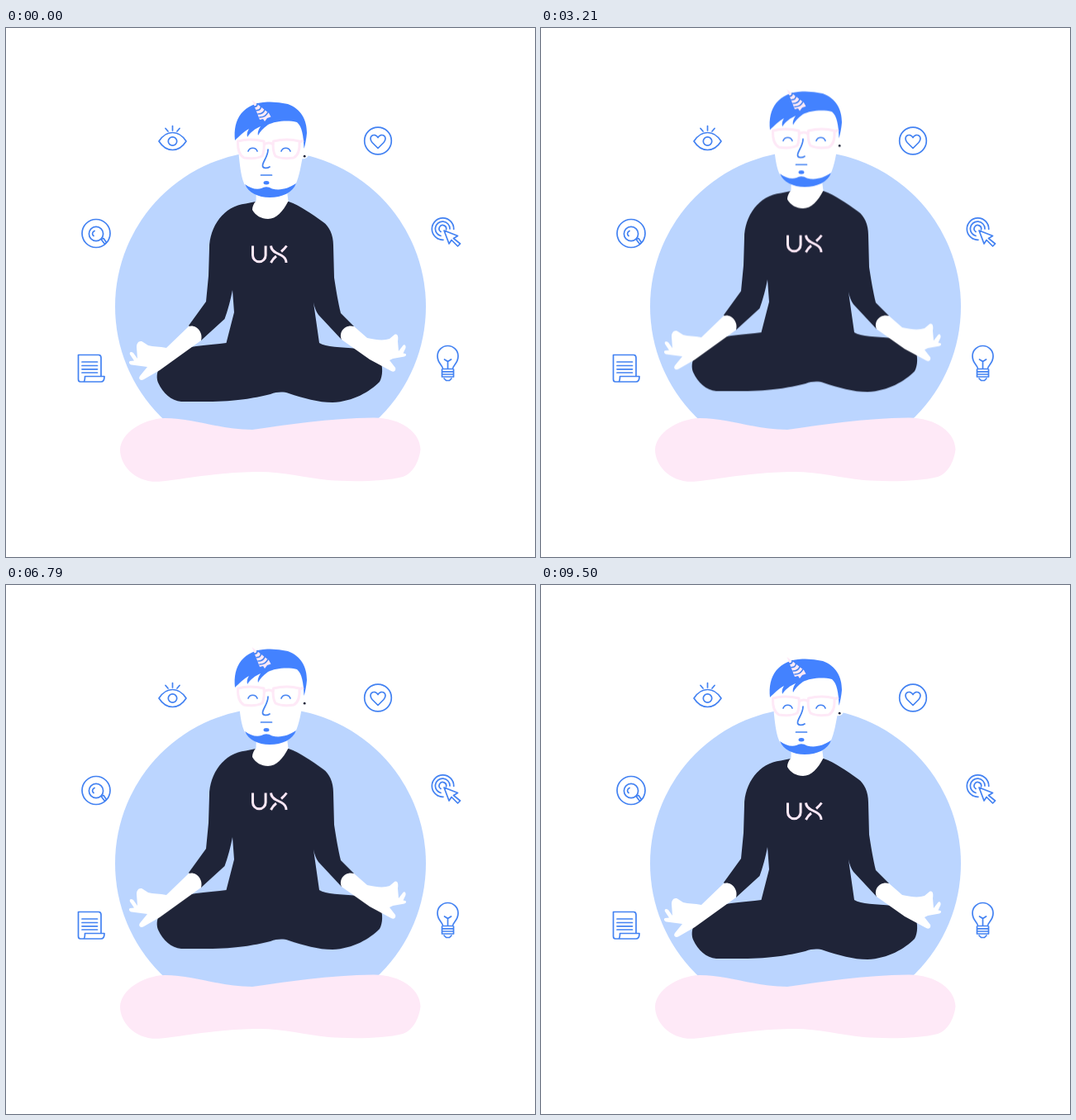
These frames come from a looping animation (640 by 640 pixels, 9570 ms). An HTML page:

```html
<!DOCTYPE html>
<html lang="en">
<head>
<meta charset="utf-8">
<title>Meditation</title>
<style>
  html, body { margin: 0; width: 100%; height: 100%; overflow: hidden; background: #fff; }
  svg { display: block; width: 100%; height: 100%; }
  .blue { fill: #4382ff; }
  .navy { fill: #1f2438; }
  .pink { fill: #fee9f7; }
  .white { fill: #fff; }
  .line { fill: none; stroke: #4382f2; stroke-width: 1.7; stroke-linecap: round; stroke-linejoin: round; }
  .rose { fill: none; stroke: #fee9f7; stroke-width: 3; stroke-linejoin: round; }
  .float { animation: float 9570ms linear infinite; }
  @keyframes float {
    0% { transform: translateY(0); animation-timing-function: cubic-bezier(.333, 0, .667, 1); }
    52.25% { transform: translateY(-18px); }
    52.98% { transform: translateY(-18px); animation-timing-function: cubic-bezier(.333, 0, .667, 1); }
    99.27%, 100% { transform: translateY(0); }
  }
</style>
</head>
<body>
<svg viewBox="0 0 640 640">
  <circle cx="320" cy="337" r="188" fill="#bbd5ff"/>
  <path class="pink" d="M138 510C139 490 165 473 192 472C228 472 258 486 298 486C340 480 390 472 445 471.500C480 472 501 490 501.500 510C500 522 494 538 480 543C458 549 415 549 390 547C360 544 335 536 300 537C250 538 215 546 188 548.500C158 552 138 530 138 510Z"/>

  <g class="line">
    <g id="eye">
      <path d="M185 137C194 123 209 123 218 137C209 151 194 151 185 137ZM201.500 118.500V124M193 121.500L196 125M210 121.500L207 125"/>
      <circle cx="201.500" cy="137" r="5.200"/>
    </g>
    <g id="heart">
      <circle cx="450" cy="136.500" r="16.300"/>
      <path d="M450 145.500L443 138.500C437 131 446 126 450 132.500C454 126 463 131 457 138.500Z"/>
    </g>
    <g id="search">
      <circle cx="109" cy="248.500" r="17"/>
      <circle cx="109" cy="249" r="8.600"/>
      <path d="M107 245.500C104 247 104 250 106 251.500M115 255.500L118 254.500L121.500 259.500L119.500 261.500Z"/>
    </g>
    <g id="target">
      <path d="M529 256.300A13.200 13.200 0 1 1 541.700 243.500M526 251.500A8.800 8.800 0 1 1 537 243M526 246.500A4.300 4.300 0 1 1 532.500 244"/>
      <path d="M530 245L546.500 251.500L541.500 254.500L549.500 261L546.500 264L539 256.500L536 261Z"/>
    </g>
    <g id="scroll">
      <path d="M94 428H90Q87.500 428 87.500 425V395.500H112Q115 395.500 115 399V421.500M94 428Q95.500 427 95.500 421.500H119Q119 428 115 428ZM92 404H110.500M92 408.500H110.500M92 412.800H110.500M92 417H110.500"/>
    </g>
    <g id="bulb">
      <path d="M528.500 412.500C528.500 408 522 406 522 397A12.500 12.500 0 0 1 547 397C547 406 540.500 408 540.500 412.500ZM534.500 412V403.500L530.500 401M534.500 403.500L538.500 401"/>
      <path d="M528 415.800H541M528 419H541M528 422H541M530 424L532.500 426.500H536.500L539 424M527.500 413V422M541.500 413V422"/>
    </g>
  </g>

  <g class="float">
    <path class="navy" d="M302 210L290 212.500C264 215 246 240 246 267L245 300L242 331L221 360L236 378L264.500 352C268 343 272 328 274 317L276 344L266.500 381C245 384 225 384 215 389L186 411C182 416 182 424 184 429C190 442 200 451 212 452L250 452C285 451 303 447 320 443C328 440 336 440 342 442C360 448 378 453 395 453C420 452 440 440 452 428C456 421 456 410 453 402C445 393 435 388 425 388C405 386 387 386 379 381L372 332C373 337 375 343 378 347L406 377L421 361L405 345C402 333 399 315 397 302L396 263C396 250 391 240 384 235C370 225 356 215 342 210Z"/>
    <path class="white" d="M303 190L302.500 209C299 213 298 217 298 220C302 227 309 231 317 231C327 231 335 222 341.500 209.500L339 190Z"/>
    <path class="white" d="M221 361L194 387C186 385 178 386 172 384L165 379.500C161 378 158 381 158 386L159 400L154 393C151 391 149 392 150 395L155 402.500L150 403C148 404 149 407 152 407.500L171 410L162 421C160 424 162 427 166 425.500L186 414L236 378C239 368 230 358 221 361Z"/>
    <path class="white" d="M421 361L437 375C450 378 458 378 464 376L470 371C474 369 475 374 474 379L475 391L480 384.500C482 382 484 384 483.500 387L480.500 393.500C485 393.500 485 396.500 482 397.500L468 400L464 402L471 411C472 414 470 417 466 415L440 401L406 377C402 368 410 358 421 361Z"/>

    <g id="head">
      <path class="white" d="M280 125L281 146C283 170 285 182 289 190C298 204 341 204 350 190C355 180 357 165 358.500 158C368 160 369 145 361 143L357 110H290Z"/>
      <path class="blue" d="M277 136C274 110 287 91 316 89.500Q329 89 341 92C357 98 364 111 364 127Q363 138 360.500 146C360 130 358 119 352 114C340 111 325 113 317 117C311 121 307 126 305 130C304 126 306 122 308 119C301 122 296 126 292 132C291 128 292 125 294 122C288 125 282 131 277 136Z"/>
      <path class="pink" d="M297.500 87L307 111L311 110L313 113L316 109L320.500 107.500L318 103Z"/>
      <path class="line" stroke-width="1.400" d="M300.500 95Q304 95.500 304 91.500M303 99.500Q308 100 308.500 95M305 104Q311 104 313 99M307 108Q314 108 316.500 102.500"/>
      <g class="rose">
        <path d="M280.500 137Q295 133 312 137Q313 148 310 155Q302 159 288 157Q280 153 280.500 137Z"/>
        <path d="M323.500 137Q340 133 355 137Q356 153 348 157Q334 159 326 155Q322 148 323.500 137Z"/>
        <path d="M312 141Q318 137 323.500 141M355 138L360 136"/>
      </g>
      <path class="line" d="M293 149C295 144 302 144 304 149M333 149C335 144 342 144 344 149M317 147C317 156 310 162 310.500 167C311 170 316 170 319 168M308.500 178H321.500"/>
      <ellipse class="blue" cx="315" cy="187.300" rx="3.400" ry="2.200"/>
      <path class="blue" d="M289 189C296 194 303 196 309 194Q315 190.500 322 194.500C332 197 342 194 351 188C347 199 334 205 319 205C305 205 293 199 289 189Z"/>
      <circle class="navy" cx="361.200" cy="155.200" r="1.400"/>
    </g>

    <g class="rose" role="img" aria-label="UX">
      <path d="M298.500 263.500V275A7.800 7.800 0 0 0 314.100 275V263.500"/>
      <path d="M320.500 263.500Q321 269 327 272L333 275Q339 278 339 284M339.500 263.500Q337 267 333 270.500M327 276Q323 279 320.500 284"/>
    </g>
  </g>
</svg>
</body>
</html>
```
